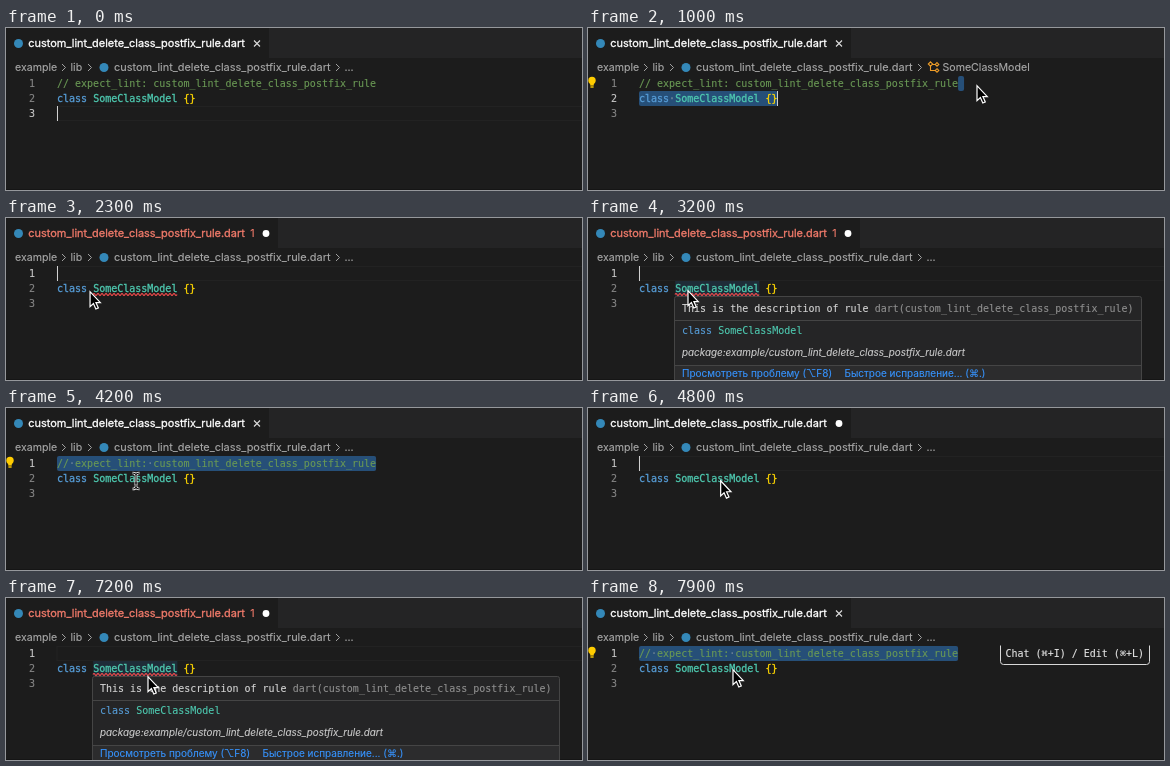
An HTML page for the animation above (8 s loop, 576 px wide and 162 px high).

```html
<!DOCTYPE html>
<html lang="en">
<head>
<meta charset="utf-8">
<title>Lint rule demo</title>
<style>
  html, body { margin: 0; width: 100%; height: 100%; overflow: hidden; background: #1c1c1c; }
  svg { display: block; width: 576px; height: 162px; }
  text { white-space: pre; stroke-width: .12px; }
  .mono { font: 10px "DejaVu Sans Mono", monospace; }
  .ui { font: 10.6px Inter, "Liberation Sans", sans-serif; }
  .file { font-size: 10.95px; }
  .small { font-size: 10px; }
  .italic { font-size: 9.9px; font-style: italic; }
  .strong { stroke-width: .3px; }
</style>
</head>
<body>
<svg id="stage" viewBox="0 0 576 162"></svg>
<script>
const LOOP = 8000, LEFT = 51, CHAR = 6.02, LINE = 15, TOP = 48;
const BACKGROUND = '#1c1c1c';
const RULE = 'custom_lint_delete_class_postfix_rule';
const COMMENT = '// expect_lint: ' + RULE;
const COMMENT_END = LEFT + COMMENT.length * CHAR;
const CLASS_END = LEFT + 23 * CHAR;

// The comment is deleted and restored twice: [deleted, restored, hover starts].
const EDITS = [[2000, 3700, 2800], [4700, 7400, 5600]];

// Pointer path: time, x, y
const POINTER = [
  [100, 330, 113], [500, 385, 72], [800, 389, 58], [1100, 389, 58],
  [1200, 380, 58], [1800, 45, 60], [1900, 54, 64], [2300, 84, 74],
  [2600, 100, 73], [3700, 100, 73], [4200, 130, 73], [4700, 132, 73],
  [5300, 136, 74], [6650, 136, 74], [6900, 177, 79], [7000, 142, 79],
  [7400, 142, 79], [7800, 145, 72], [8000, 145, 72]
];

const clamp = (v, lo, hi) => Math.min(hi, Math.max(lo, v));
const within = (t, from, to) => t >= from && t < to;

const text = (x, y, fill, content, cls = 'mono') =>
  `<text x="${x}" y="${y}" fill="${fill}" stroke="${fill}" class="${cls}">${content}</text>`;
const rect = (x, y, w, h, fill, extra = '') =>
  `<rect x="${x}" y="${y}" width="${w}" height="${h}" fill="${fill}" ${extra}/>`;
const stroke = (d, color, width = 1) =>
  `<path d="${d}" fill="none" stroke="${color}" stroke-width="${width}"/>`;
const dot = (x, y, r, fill) => `<circle cx="${x}" cy="${y}" r="${r}" fill="${fill}"/>`;
const span = (fill, content) => `<tspan fill="${fill}" stroke="${fill}">${content}</tspan>`;
const lineTop = n => TOP + (n - 1) * LINE;
const chevron = x => stroke(`M${x - 2} 36l3.5 3.5l-3.5 3.5`, '#a0a0a0');

function pointerAt(t) {
  const i = POINTER.findIndex(p => p[0] > t);
  if (i < 1) return null;
  const [t0, x0, y0] = POINTER[i - 1], [t1, x1, y1] = POINTER[i];
  const k = (t - t0) / (t1 - t0);
  return { x: x0 + (x1 - x0) * k, y: y0 + (y1 - y0) * k };
}

function stateAt(t) {
  const edit = EDITS.find(([del, undo]) => within(t, del, undo));
  const lastChange = Math.max(0, ...[500, 1100, ...EDITS.flatMap(e => e.slice(0, 2))].filter(c => c <= t));
  const s = {
    pointer: pointerAt(t),
    deleted: !!edit,
    error: EDITS.some(([del, undo]) => within(t, del + 200, undo + 100)),
    hovered: !!edit && t >= edit[2],
    popup: edit ? clamp((t - edit[2] - 50) / 150, 0, 1) : 0,
    bulb: within(t, 1000, 2000) || within(t, 3900, 4700) || t >= 7600,
    hint: within(t, 4300, 4700) || t >= 7800,
    inClass: within(t, 600, 1200),
    line: t < 500 ? 3 : t < 1100 ? 2 : 1,
    selectBoth: within(t, 800, 1100),
    caretOn: (t - lastChange) % 1000 < 500 || within(t, 800, 1900),
    ibeam: within(t, 4000, 4600),
    selected: 0
  };
  s.caretX = LEFT;
  if (s.line === 2) s.caretX = CLASS_END;
  if (s.line === 1 && !s.deleted) {
    const dragging = t < 2000;
    const column = dragging ? clamp(Math.round((s.pointer.x - LEFT) / CHAR), 0, COMMENT.length) : 0;
    s.selected = COMMENT.length - column;
    s.caretX = dragging ? LEFT + column * CHAR : COMMENT_END;
  }
  return s;
}

function tabBar(s) {
  const width = s.error ? 272 : 263;
  const color = s.error ? '#f07a6a' : '#ffffff';
  const close = s.deleted
    ? dot(s.error ? 260 : 251, 15.5, 3.4, '#fff')
    : stroke(`M${s.error ? 257 : 248} 12.5l6 6m0-6l-6 6`, '#ddd', 1.1);
  return rect(0, 0, 576, 30, '#242425') + rect(0, 0, width, 30, BACKGROUND) +
    dot(12.5, 15.5, 4.5, '#3488b8') +
    text(22.3, 19, color, RULE + '.dart', 'ui file strong') +
    (s.error ? text(244.3, 19, color, '1', 'ui') : '') + close;
}

function breadcrumbs(s) {
  const gray = '#a9a9a9';
  const icon = stroke('M344 36.5h4M342.5 38v4.5h5', '#ee9d28', 1.1) +
    stroke('M342.5 33.8l2.2 2.2l-2.2 2.2l-2.2-2.2zM349 34.6l1.8 1.8l-1.8 1.8l-1.8-1.8zM349 40.7l1.8 1.8l-1.8 1.8l-1.8-1.8z', '#ee9d28', 1.1);
  return text(9, 43, gray, 'example', 'ui') + chevron(58) + text(64.5, 43, gray, 'lib', 'ui') +
    chevron(84) + dot(98, 39.5, 4.5, '#3488b8') +
    text(108, 43, gray, RULE + '.dart', 'ui file') + chevron(332) +
    (s.inClass ? icon + text(354.5, 43, gray, 'SomeClassModel', 'ui') : text(338.5, 43, gray, '...', 'ui'));
}

function editor(s) {
  const blue = '#264f78', faint = '#6f8597';
  let out = '';
  if (s.selectBoth) {
    out += rect(COMMENT_END, TOP, 6, LINE, blue, 'rx="2"') +
      rect(LEFT, lineTop(2), CLASS_END - LEFT, LINE, blue, 'rx="2"');
  } else if (s.selected) {
    const w = s.selected * CHAR;
    out += rect(COMMENT_END - w, TOP, w, LINE, blue, 'rx="2"');
  } else {
    out += rect(LEFT, lineTop(s.line) + .5, 530, LINE - 1, 'none', 'stroke="#222"');
  }
  if (s.hovered) out += rect(LEFT + 6 * CHAR, lineTop(2), 14 * CHAR, LINE, blue, 'opacity=".3"');
  for (let n = 1; n <= 3; n++) {
    out += text(23, lineTop(n) + 11, n === s.line ? '#c6c6c6' : '#858585', n);
  }
  if (!s.deleted) {
    const from = COMMENT.length - s.selected;
    const marked = COMMENT.slice(from).replace(/ /g, span(faint, '·'));
    out += text(LEFT, TOP + 11, '#6a9955', COMMENT.slice(0, from) + marked);
  }
  out += text(LEFT, lineTop(2) + 11, '#569cd6',
    'class' + (s.selectBoth ? span(faint, '·') : ' ') +
    span('#4ec9b0', 'SomeClassModel') + ' ' + span('#ffd700', '{}'), 'mono strong');
  if (s.error) out += stroke('M87 76.5' + 'q1 -2 2 0t2 0'.repeat(21), '#f14c4c', 1.2);
  if (s.bulb) {
    out += dot(4, 52.5, 3.7, '#ffcc00') + rect(2.2, 55, 3.6, 2.6, '#ffcc00') + rect(2.4, 58.3, 3.2, 1.4, '#ffcc00');
  }
  if (s.caretOn) out += rect(Math.round(s.caretX), lineTop(s.line), 1, LINE, '#d0d0d0');
  return out;
}

function hint() {
  return `<path d="M412.5 47.5V63.5q0 3 3 3H558.5q3 0 3-3V47.5" fill="${BACKGROUND}" stroke="#d8d8d8"/>` +
    text(417.5, 59, '#e4e4e4', 'Chat (⌘+I) / Edit (⌘+L)');
}

function popup(opacity) {
  const link = '#3794ff', border = '#454545';
  return `<g opacity="${opacity}">` +
    rect(86.5, 78.5, 467, 90, '#252526', `stroke="${border}" rx="2"`) +
    rect(87, 148, 466, 14, '#2c2c2d') +
    rect(87, 102, 466, 1, border) + rect(87, 147, 466, 1, border) +
    text(94, 94, '#d4d4d4', 'This is the description of rule ' + span('#8f8f8f', `dart(${RULE})`)) +
    text(94, 116, '#569cd6', 'class ' + span('#4ec9b0', 'SomeClassModel')) +
    text(94, 138, '#cccccc', `package:example/${RULE}.dart`, 'ui italic') +
    text(94, 159, link, 'Просмотреть проблему (⌥F8)', 'ui small') +
    text(256.5, 159, link, 'Быстрое исправление... (⌘.)', 'ui small') + '</g>';
}

function pointer({ x, y }, ibeam) {
  if (ibeam) {
    const d = 'M-3.5 -8q3.5 0 3.5 2.5q0 -2.5 3.5 -2.5M0 -5.5V5.5M-3.5 8q3.5 0 3.5 -2.5q0 2.5 3.5 2.5M-2 2h4';
    return `<g transform="translate(${x} ${y})">${stroke(d, '#fff', 2.6)}${stroke(d, '#000', 1.1)}</g>`;
  }
  return `<path transform="translate(${x} ${y})" d="M0 -.3V14.7L3.4 11.6L5.8 17L8.3 15.9L5.9 10.6H10.3Z" fill="#000" stroke="#fff" stroke-width="1.2"/>`;
}

const stage = document.getElementById('stage');

function render(t) {
  const s = stateAt(t);
  stage.innerHTML = rect(0, 0, 576, 162, BACKGROUND) + rect(0, 161, 576, 1, '#151515') +
    editor(s) + (s.hint ? hint() : '') + tabBar(s) + breadcrumbs(s) +
    (s.popup ? popup(s.popup) : '') + (s.pointer ? pointer(s.pointer, s.ibeam) : '');
}

const start = performance.now();
function tick() {
  render((performance.now() - start) % LOOP);
  requestAnimationFrame(tick);
}
tick();
</script>
</body>
</html>
```
